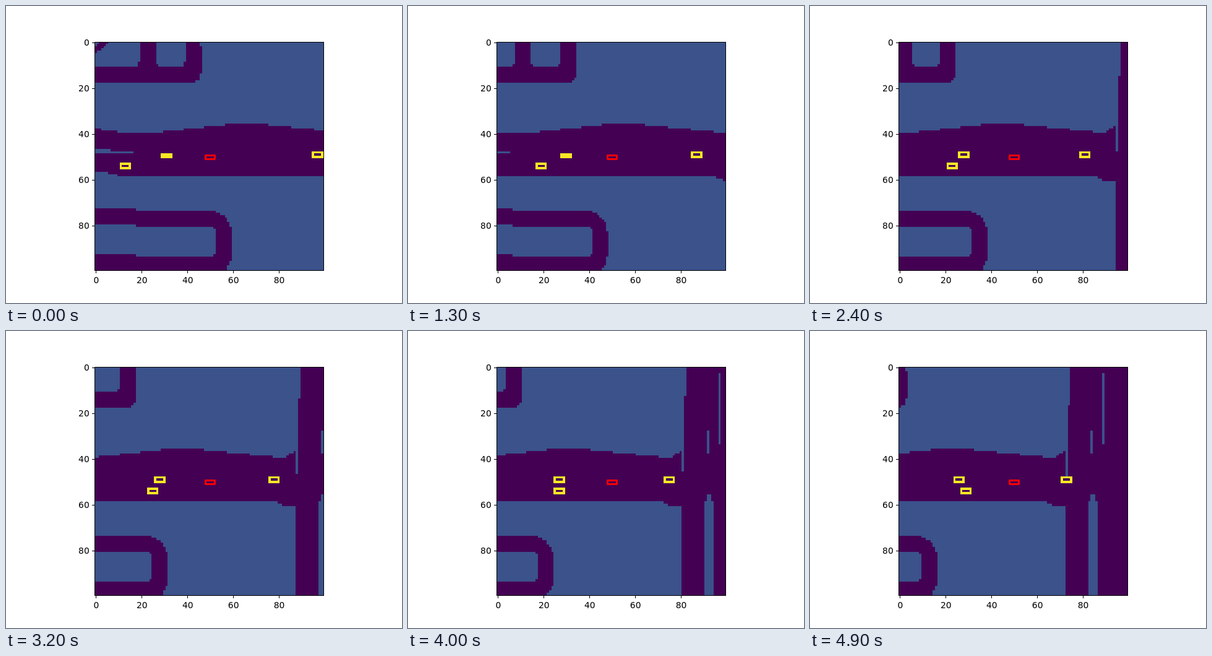
Animation, 640 px wide and 480 px high, one loop 5000 ms. Source, as an HTML page with a canvas:

```html
<!DOCTYPE html>
<html lang="en">
<head>
<meta charset="utf-8">
<title>Road grid</title>
<style>
html, body { margin: 0; width: 100%; height: 100%; overflow: hidden; background: #fff; }
canvas { display: block; width: 640px; height: 480px; }
</style>
</head>
<body>
<canvas id="stage" width="640" height="480"></canvas>
<script>
const ctx = document.getElementById('stage').getContext('2d');
const CELL = 3.696, SIZE = 100;
const ROAD = '#440154', LAND = '#3b528b', CAR = '#fde725';
const LOOP = 5000, STEP = 100, SPEED = 0.8775;

const { abs, max, min, hypot, round, floor } = Math;
const px = c => round(143 + c * CELL);
const py = r => round(57.2 + r * CELL);

function cells(x, y, w, h, color) {
  ctx.fillStyle = color;
  ctx.fillRect(px(x), py(y), px(x + w) - px(x), py(y + h) - py(y));
}

// Is the point inside a box with rounded corners?
function inBox(x, y, x0, y0, x1, y1, r = 0) {
  const dx = max(0, x0 + r - x, x - x1 + r);
  const dy = max(0, y0 + r - y, y - y1 + r);
  return hypot(dx, dy) <= r;
}

function upperRoad(x, y) {
  const lane = x + y > 2 && x + 1.2 * y < 6.8;
  const hole = inBox(x, y, -20, -9, 19.6, 11, 2.5) || inBox(x, y, 26.6, -9, 39.55, 11, 2.5);
  return lane || inBox(x, y, -20, -2, 46.55, 18, 4.3) && !hole;
}

function mainRoad(x, y) {
  const hump = 35.5 + abs(x - 66) / (x < 66 ? 9 : 10);
  const ramp = 38.07 + x / 7;
  const flare = 39.5 - (x - 112) * 0.7;
  const top = min(40, hump, ramp, flare);
  const left = max(57, min(59, 57.5 + (x - 6) / 4));
  const right = min(61, 59.5 + (x - 107.6) / 2.4);
  const island = y > 47 && y < 49 && x < 10 * (y - 47) + 2;
  return y > top && y < max(left, right) && !island;
}

function crossRoad(x, y) {
  const wedge = abs(x - 128) < min(2, (y - 55) * 0.4);
  const strip = inBox(x, y, 127, 28, 128, 38) || inBox(x, y, 132, 3, 133, 34);
  return x >= max(116, 118 - y / 33) && !wedge && !strip;
}

function lowerRoad(x, y) {
  if (x < 18) y++;
  return inBox(x, y, -20, 74, 60, 103, 10) && !inBox(x, y, -20, 81, 53, 94, 2);
}

function isRoad(x, y) {
  if (x >= 116) return crossRoad(x, y);
  return upperRoad(x, y) || mainRoad(x, y) || lowerRoad(x, y);
}

function map(scroll) {
  cells(0, 0, SIZE, SIZE, LAND);
  for (let r = 0; r < SIZE; r++) {
    for (let c = 0; c < SIZE; c++) {
      if (isRoad(c + 0.5 + scroll, r + 0.5)) cells(c, r, 1, 1, ROAD);
    }
  }
}

function car(x, row, solid) {
  x = round(x);
  if (solid) return cells(x, row + 1, 5, 2, CAR);
  cells(x, row, 5, 3, CAR);
  cells(x + 1, row + 1, 3, 1, ROAD);
}

function cars(t) {
  car(11 + 5 * t - 0.36 * t * t, 53);
  car(29.45 - 1.3 * t + 0.025 * t * t, 48, t < 2.1);
  car(95 - 8.4 * t + 0.725 * t * t, 48);
  ctx.strokeStyle = '#f00';
  ctx.lineWidth = 2.78;
  ctx.lineJoin = 'round';
  ctx.strokeRect(322.5, 241.5, 15, 6);
}

function axes() {
  ctx.strokeStyle = ctx.fillStyle = '#000';
  ctx.lineWidth = 1;
  ctx.lineJoin = 'miter';
  ctx.strokeRect(143.5, 58.5, 370, 369);
  ctx.font = '13.89px "DejaVu Sans", sans-serif';
  for (let v = 0; v < SIZE; v += 20) {
    const x = 145.05 + v * CELL, y = 59.45 + v * CELL;
    ctx.fillRect(round(x), 428, 1, 4);
    ctx.fillRect(139, round(y), 4, 1);
    ctx.textAlign = 'center';
    ctx.fillText(v, x + 0.85, 448);
    ctx.textAlign = 'right';
    ctx.fillText(v, 134.75, floor(y + 5));
  }
}

function draw(step) {
  ctx.fillStyle = '#fff';
  ctx.fillRect(0, 0, 640, 480);
  ctx.save();
  ctx.beginPath();
  ctx.rect(143, 58, 371, 370);
  ctx.clip();
  map(step * SPEED);
  cars(step * STEP / 1000);
  ctx.restore();
  axes();
}

const start = performance.now();
let shown = -1;
function tick() {
  const step = floor((performance.now() - start) % LOOP / STEP);
  if (step !== shown) draw(shown = step);
  requestAnimationFrame(tick);
}
tick();
</script>
</body>
</html>
```
